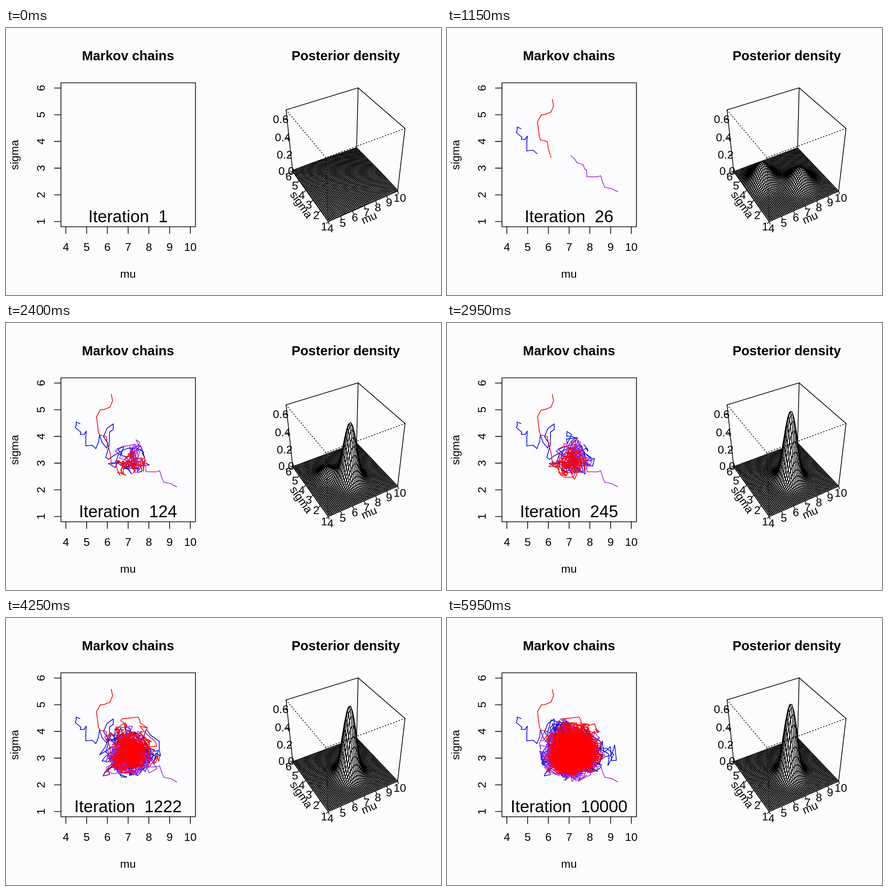
These frames come from a looping animation (954x587 px, 6 s). An HTML page with a canvas:

```html
<!DOCTYPE html>
<html lang="en">
<head>
<meta charset="utf-8">
<title>Markov chains</title>
<style>
  html, body { margin: 0; width: 954px; height: 587px; overflow: hidden; background: #fcfcfe; }
  canvas, svg { position: absolute; left: 0; top: 0; }
  text { font: 24.7px "Liberation Sans", Arial, sans-serif; text-anchor: middle; white-space: pre; }
  .title { font-size: 29.1px; font-weight: bold; }
  .count { font-size: 36.9px; }
  path { fill: none; stroke: #000; stroke-width: 1.6; stroke-linecap: round; stroke-linejoin: round; }
  .dotted { stroke-dasharray: 1.6 4.8; }
</style>
</head>
<body>
<script>
const W = 954, H = 587, STEP = 50, LOOP = 6000, MAX_ITER = 10000;

function addCanvas() {
  const canvas = document.createElement('canvas');
  canvas.width = W;
  canvas.height = H;
  document.body.append(canvas);
  const ctx = canvas.getContext('2d');
  ctx.lineJoin = ctx.lineCap = 'round';
  return ctx;
}

const bell = (v, center, spread) => Math.exp(-(((v - center) / spread) ** 2) / 2);

// Log-spaced iteration counts, rounded, without repeats
const counts = [...new Set(Array.from({ length: 150 },
  (_, k) => Math.round(Math.exp(k / 149 * Math.log(MAX_ITER)))))];

// ---- Chains ----
function randomSource(seed) {
  return () => {
    seed = seed + 0x6d2b79f5 | 0;
    let v = Math.imul(seed ^ seed >>> 15, 1 | seed);
    v = v + Math.imul(v ^ v >>> 7, 61 | v) ^ v;
    return ((v ^ v >>> 14) >>> 0) / 4294967296;
  };
}

const KEY_ITERATIONS = 4;

// Burn-in wanders from key to key; then a Metropolis walk around the mode.
// `side` is the weight of a small second mode.
function makeChain(color, seed, side, keys) {
  const random = randomSource(seed);
  const normal = () => Math.sqrt(-2 * Math.log(1 - random())) * Math.cos(2 * Math.PI * random());
  const target = (x, y) => bell(x, 274, 20) * bell(y, 299, y < 299 ? 21 : 17.5) +
    side * bell(x, 240, 13) * bell(y, 232, 15);
  const burnIn = (keys.length - 1) * KEY_ITERATIONS;
  const points = [];
  let [x, y] = keys[0];
  for (let i = 0; i < MAX_ITER; i++) {
    const k = Math.floor(i / KEY_ITERATIONS), phase = i % KEY_ITERATIONS;
    if (i <= burnIn && phase === 0) {
      [x, y] = keys[k];
    } else if (i < burnIn && phase === 2) {
      x = (keys[k][0] + keys[k + 1][0]) / 2 + 3.5 * normal();
      y = (keys[k][1] + keys[k + 1][1]) / 2 + 3.5 * normal();
    } else if (i > burnIn) {
      const nx = x + 11 * normal(), ny = y + 12 * normal();
      if (random() < target(nx, ny) / target(x, y)) { x = nx; y = ny; }
    }
    points.push([x, y]);
  }
  const ctx = addCanvas();
  ctx.strokeStyle = color;
  ctx.lineWidth = 1.6;
  return { ctx, points, drawn: 1 };
}

const chains = [
  makeChain('#0000f0', 11, 0.02, [[162, 221], [154, 223], [164, 240], [171, 245], [176, 238], [175, 270],
    [197, 276], [205, 246], [221, 275], [214, 250], [235, 222], [227, 240], [219, 295]]),
  makeChain('#9a2be6', 23, 0, [[374, 360], [346, 350], [337, 325], [307, 327], [302, 310], [285, 296],
    [272, 281], [276, 307], [284, 272], [290, 292]]),
  makeChain('#ff0000', 37, 0, [[231, 157], [228, 185], [207, 191], [200, 218], [205, 246], [220, 250],
    [228, 284], [231, 310], [279, 315], [304, 296]])
];

function drawChain(chain, n) {
  const { ctx, points } = chain;
  if (n < chain.drawn) {
    ctx.clearRect(0, 0, W, H);
    chain.drawn = 1;
  }
  while (chain.drawn < n) {
    const end = Math.min(n, chain.drawn + 100);
    ctx.beginPath();
    for (let i = chain.drawn - 1; i < end; i++) ctx.lineTo(...points[i]);
    ctx.stroke();
    chain.drawn = end;
  }
}

// ---- Perspective view: mu 4..10, sigma 1..6, density 0..0.7 ----
const SIN_T = Math.sin(Math.PI / 6), COS_T = Math.cos(Math.PI / 6);
const SIN_P = Math.sin(Math.PI / 4.5), COS_P = Math.cos(Math.PI / 4.5);

function project(mu, sigma, density) {
  const x = (mu - 7) / 3, y = (sigma - 3.5) / 2.5, z = 0.995 * (density / 0.35 - 1);
  const across = x * COS_T - y * SIN_T, back = x * SIN_T + y * COS_T;
  const scale = 909.5 / (10.17 + back * COS_P - z * SIN_P);
  return [740.8 + scale * across, 272.6 - scale * (z * COS_P + back * SIN_P)];
}

const line = (...points) => 'M' + points.map(p => p.map(v => v.toFixed(1)).join()).join('L');
const corners = density => [[4, 1], [10, 1], [4, 6], [10, 6]].map(c => project(...c, density));
const [near, right, left, far] = corners(0);
const [nearTop, rightTop, leftTop, farTop] = corners(0.7);
const backBox = new Path2D(line(near, right, far, left, near) +
  line(left, leftTop, farTop, rightTop, right) + line(far, farTop));

// Two bumps narrow over time, and the side one melts into the main one
function densityAt(frame) {
  const settle = Math.exp(-frame / 10);
  const drift = Math.exp(-((frame / 25) ** 2));
  const sideWeight = 0.55 / (1 + Math.exp((frame - 44) / 4));
  const width = 1 - 0.09 * bell(frame, 54, 3) + 0.09 * bell(frame, 71, 7);
  const spreadMu = (0.48 + 1.7 * settle) * width;
  const spreadSigma = (0.43 + 1.5 * settle) * width;
  const bump = (mu, sigma, centerMu, centerSigma) =>
    bell(mu, centerMu, spreadMu) * bell(sigma, centerSigma, spreadSigma);
  return (mu, sigma) => (
    sideWeight * bump(mu, sigma, 5.2 + 0.014 * frame, 4 + Math.exp(-frame / 15)) +
    (1 - sideWeight) * bump(mu, sigma, 7.23 + 1.6 * drift, 3.15 - 0.7 * drift)
  ) / (2 * Math.PI * spreadMu * spreadSigma);
}

const GRID = 50;
const surface = addCanvas();

function drawSurface(frame) {
  const density = densityAt(frame);
  const mesh = Array.from({ length: GRID }, (_, i) => Array.from({ length: GRID }, (_, j) => {
    const mu = 4 + 6 * i / (GRID - 1), sigma = 1 + 5 * j / (GRID - 1);
    return project(mu, sigma, density(mu, sigma));
  }));
  surface.clearRect(0, 0, W, H);
  surface.strokeStyle = '#000';
  surface.fillStyle = '#fcfcfe';
  surface.lineWidth = 1.6;
  surface.stroke(backBox);
  surface.lineWidth = 1.45;
  for (let i = GRID - 2; i >= 0; i--) {
    for (let j = GRID - 2; j >= 0; j--) {
      surface.beginPath();
      for (const p of [mesh[i][j], mesh[i + 1][j], mesh[i + 1][j + 1], mesh[i][j + 1]]) surface.lineTo(...p);
      surface.closePath();
      surface.fill();
      surface.stroke();
    }
  }
}

// ---- Axes and text ----
const svg = document.createElementNS('http://www.w3.org/2000/svg', 'svg');
svg.setAttribute('width', W);
svg.setAttribute('height', H);
document.body.append(svg);

function add(tag, attributes, content = '') {
  const node = document.createElementNS(svg.namespaceURI, tag);
  for (const name in attributes) node.setAttribute(name, attributes[name]);
  node.textContent = content;
  svg.append(node);
  return node;
}

const label = (content, x, y, angle = 0, kind = '') => add('text',
  { dy: '.36em', class: kind, transform: `translate(${x} ${y}) rotate(${angle})` }, content);
const stroke = (d, kind = '') => add('path', { d, class: kind });

function tick3d(content, [x, y], dx, dy) {
  stroke(line([x, y], [x + dx * 0.4, y + dy * 0.4]));
  label(content, x + dx, y + dy);
}

stroke('M120.5 120.5H415.5V437H120.5Z');
for (let mu = 4; mu <= 10; mu++) {
  const x = 131.3 + (mu - 4) * 45.5;
  stroke(`M${x} 437V452`);
  label(mu, x, 481);
  tick3d(mu, project(mu, 1, 0), 5, 14.2);
}
for (let sigma = 1; sigma <= 6; sigma++) {
  const y = 425.5 - (sigma - 1) * 58.7;
  stroke(`M120.5 ${y}H106`);
  label(sigma, 76, y, -90);
  tick3d(sigma, project(4, sigma, 0), -9, 10.4);
}
for (const z of [0, 0.2, 0.4, 0.6]) tick3d(z.toFixed(1), project(4, 6, z), -14, -2);
stroke(line(leftTop, nearTop, rightTop) + line(nearTop, near), 'dotted');

label('Markov chains', 267.5, 60.5, 0, 'title');
label('Posterior density', 745, 60.5, 0, 'title');
label('mu', 267.5, 540);
label('sigma', 18, 279, -90);
label('mu', 796, 416.5, -24);
label('sigma', 648, 388, 55);
const counter = label('', 267.7, 413.7, 0, 'count');

let shown = -1;
function render(now) {
  const frame = Math.floor(now % LOOP / STEP);
  if (frame === shown) return;
  shown = frame;
  const n = counts[frame];
  counter.textContent = `Iteration\u00a0\u00a0${n}`;
  for (const chain of chains) drawChain(chain, n);
  drawSurface(frame);
}

let start;
function tick(now) {
  start ??= now;
  render(now - start);
  requestAnimationFrame(tick);
}
render(0);
requestAnimationFrame(tick);
</script>
</body>
</html>
```
